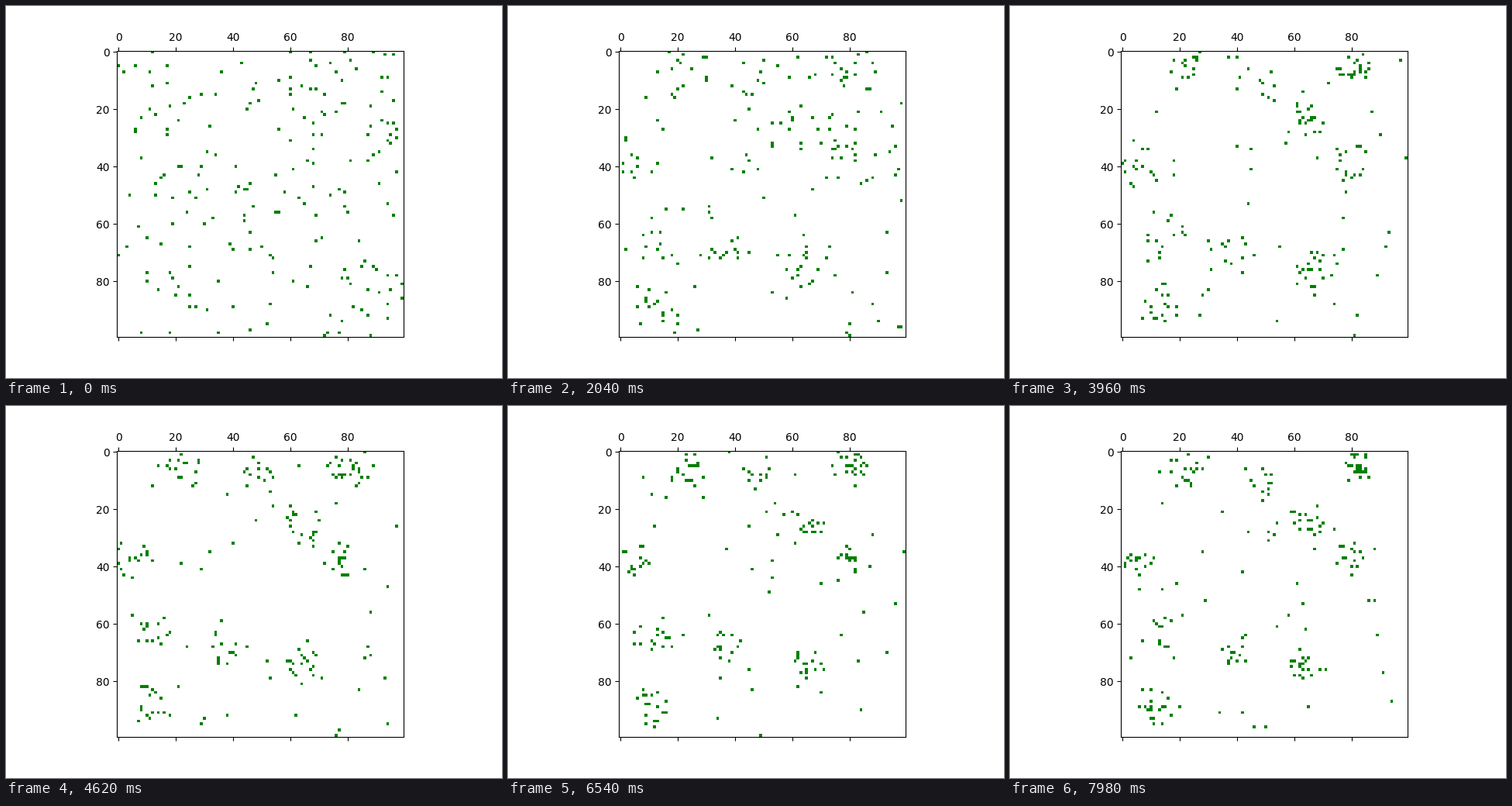
Recreate the animation shown at these times as a matplotlib script. Size 640 px wide and 480 px high, loop 8 s.

```python
import numpy as np
import matplotlib.pyplot as plt
from matplotlib.animation import FuncAnimation
from matplotlib.colors import ListedColormap

SIZE = 100
AGENTS = 200
STEPS = 134
TICK = 20          # ms per drawn frame
HOLD = 3           # drawn frames per simulation step
FRAMES = 400
REACH = 20         # how far a gathering place is sensed

# Gathering places as x + y*i
HUBS = np.array([22+6j, 48+9j, 81+5j, 65+25j, 79+38j, 5+38j,
                 14+64j, 37+69j, 65+75j, 12+89j])


def wrap(z):
    """Shortest signed offset on the torus."""
    half = SIZE / 2
    return (z.real + half) % SIZE - half + 1j * ((z.imag + half) % SIZE - half)


def simulate():
    """Wandering agents that turn more and more towards the nearest hub."""
    rng = np.random.default_rng(12)
    x, y = rng.integers(0, SIZE, (2, AGENTS))
    heading = np.exp(2j * np.pi * rng.random(AGENTS))
    loner = rng.random(AGENTS) < 0.2
    history = []
    for t in np.linspace(0, 1, STEPS):
        history.append((x, y))
        offset = wrap(HUBS[:, None] - (x + 1j * y))
        nearest = np.abs(offset).argmin(axis=0)
        offset = offset[nearest, np.arange(AGENTS)]
        dist = np.abs(offset)
        pull = min(1, 0.15 + 1.2 * t) * np.clip((dist - 2) / 7, 0, 1)
        pull[loner | (dist > REACH)] = 0

        heading = heading * np.exp(1j * rng.uniform(-0.8, 0.8, AGENTS))
        heading += pull * offset / np.maximum(dist, 1)
        heading /= np.abs(heading)
        x = (x + np.rint(heading.real).astype(int)) % SIZE
        y = (y + np.rint(heading.imag).astype(int)) % SIZE
    return history


def grid(x, y):
    cells = np.zeros((SIZE, SIZE))
    cells[y, x] = 1
    return cells


history = simulate()

fig, ax = plt.subplots(figsize=(6.4, 4.8), dpi=100)
image = ax.matshow(grid(*history[0]), cmap=ListedColormap(["white", "green"]),
                   vmin=0, vmax=1)


def update(frame):
    image.set_data(grid(*history[frame // HOLD]))
    return [image]


anim = FuncAnimation(fig, update, frames=FRAMES, interval=TICK,
                     init_func=lambda: update(0), repeat=True, repeat_delay=0)
plt.show()
```
